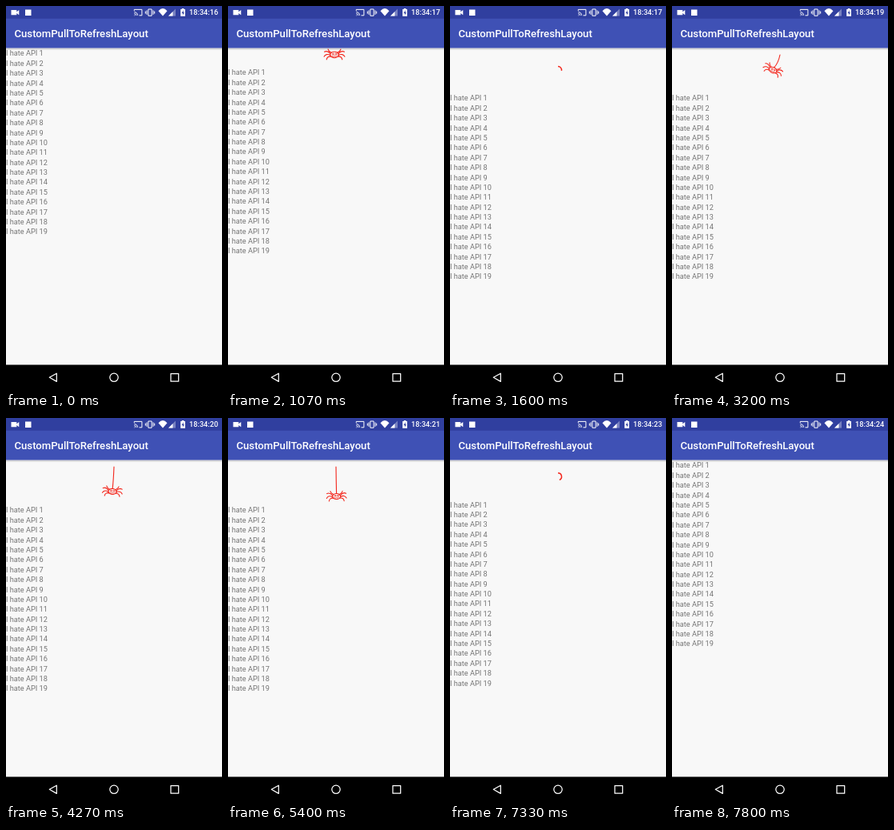
Animation of 270x480 px, one loop 7870 ms. Source, as an HTML page:

```html
<!DOCTYPE html>
<html lang="en">
<head>
<meta charset="utf-8">
<title>CustomPullToRefreshLayout</title>
<style>
  html, body { margin: 0; width: 100%; height: 100%; overflow: hidden; background: #f8f8f8; }
  svg { display: block; width: 270px; height: 480px; font-family: Roboto, sans-serif; }
</style>
</head>
<body>
<svg viewBox="0 0 270 480">
  <defs>
    <linearGradient id="shade" x2="0" y2="1">
      <stop offset="0" stop-color="#000" stop-opacity=".22"/>
      <stop offset="1" stop-color="#000" stop-opacity="0"/>
    </linearGradient>
    <g id="legs">
      <path d="M3.5-2.5C5.5-3.5 7-4 7.6-6.6M4.8-1.2C7-4 10-4.6 12-3.6M5 .6C8-1.2 11-.6 12.4 2.2M4 2.2C7 1.6 9 3 9.4 5.8"/>
    </g>
  </defs>
  <rect width="270" height="480" fill="#f8f8f8"/>

  <g fill="none" stroke="#f3261c" stroke-linecap="round">
    <path id="arc" stroke-width="1.5" stroke-linecap="butt"/>
    <g id="spider">
      <path id="thread" stroke-width="1.1"/>
      <g id="bug" stroke-width="1.1">
        <use href="#legs"/>
        <use href="#legs" transform="scale(-1 1)"/>
        <ellipse rx="5" ry="3.5"/>
        <path d="M-2.8 1.3L-1.4 2.2 0 1.4 1.4 2.2 2.8 1.3" stroke-width=".7"/>
        <g stroke-width=".7"><circle cx="-1.7" cy="-.8" r=".9"/><circle cx="1.7" cy="-.8" r=".9"/></g>
      </g>
    </g>
  </g>

  <g id="list" font-size="9.19" fill="#737373"></g>

  <rect y="52.5" width="270" height="3" fill="url(#shade)"/>
  <rect width="270" height="52.5" fill="#3f51b5"/>
  <rect width="270" height="15.75" fill="#303f9f"/>
  <text x="10.5" y="38.8" font-size="13.13" font-weight="500" fill="#fff">CustomPullToRefreshLayout</text>

  <g fill="#fff">
    <path d="M6.5 5h6.8v2.2l3-2.2v6.2l-3-2.2v2.2H6.5z"/>
    <rect x="24" y="4.5" width="7.5" height="7.5"/>
    <path d="M190.5 6.2Q196-.2 201.5 6.2L196 12.6z"/>
    <path d="M203 12.5L212 3.6V12.5z" opacity=".35"/>
    <path d="M203 12.5L208.5 7V12.5z"/>
    <path d="M219.8 3h2.6v1h1.6v8.8h-5.8V4h1.6z"/>
    <path d="M221.7 5.3l-2.1 3.6h1.3v2.6l2-3.5h-1.2z" fill="#303f9f"/>
    <text id="clock" x="265.2" y="11.3" font-size="9.19" font-weight="500" text-anchor="end"></text>
  </g>
  <g fill="none" stroke="#fff">
    <path d="M160.3 6.2V4.4h9.6v7.4h-3.4M160.3 11.8h.6M160.3 9.6q2.2 0 2.2 2.2M160.3 7.7q4.1 0 4.1 4.1"/>
    <path d="M177.9 4h4.2v8.2h-4.2zM176 5.4v5.4M174.3 6.6v3M184 5.4v5.4M185.7 6.6v3"/>
  </g>

  <rect y="448.5" width="270" height="31.5"/>
  <g fill="none" stroke="#fff" stroke-width="1.25" stroke-linejoin="round">
    <path d="M63.3 459.2V469.4L54.3 464.3z"/>
    <circle cx="135" cy="464.3" r="5.2"/>
    <rect x="206" y="459.5" width="9.7" height="9.7"/>
  </g>
</svg>
<script>
const LOOP = 7870, STEP = 200 / 3, OPEN = 56;
const $ = id => document.getElementById(id);
const clamp = x => Math.max(0, Math.min(1, x));
const show = (el, on) => el.setAttribute('visibility', on ? 'visible' : 'hidden');

for (let i = 1; i <= 19; i++) {
  const row = document.createElementNS('http://www.w3.org/2000/svg', 'text');
  row.setAttribute('y', 62.4 + (i - 1) * 12.39);
  row.textContent = 'I hate API ' + i;
  $('list').append(row);
}

// piecewise linear track of [time, value] points
function track(points, t) {
  const i = points.findIndex(p => p[0] > t);
  if (i === 0) return points[0][1];
  if (i < 0) return points[points.length - 1][1];
  const [a, x] = points[i - 1], [b, y] = points[i];
  return x + (y - x) * (t - a) / (b - a);
}

const THREAD = [[2700, 0], [2950, 13], [3200, 21], [3470, 26], [4270, 31],
  [5070, 35.8], [5400, 37], [5550, 35], [5870, 19], [6270, 0]];
const SPIN_UP = [[1500, 0], [1600, .28], [1730, .36], [1930, .42], [2700, 1]];

// the screen updates 15 times a second and stalls twice after the release
function sample(t) {
  if (t >= 1600 && t < 1730) return 1600;
  if (t >= 1730 && t < 1930) return 1730;
  return Math.floor((t + 5) / STEP) * STEP;
}

function pullOffset(t) {
  if (t < 1600) return OPEN * (1 - (1 - clamp((t - 740) / 820)) ** 1.1);
  return OPEN * (1 + Math.cos(Math.PI * clamp((t - 7220) / 500))) / 2;
}

function drawArc(v, cy) {
  const r = 4.5, end = v, start = v - (.5 - Math.abs(v - .5));
  const at = u => {
    const a = (u - .25) * 2 * Math.PI;
    return (135 + r * Math.cos(a)).toFixed(2) + ' ' + (cy + r * Math.sin(a)).toFixed(2);
  };
  $('arc').setAttribute('d', `M${at(start)}A${r} ${r} 0 0 1 ${at(end)}`);
}

function render(now) {
  const t = sample(now), off = pullOffset(t);
  const pulling = t > 740 && t < 1500;
  const hanging = t >= 2700 && t < 6270;
  const spinning = (t >= 1500 && t < 2700) || (t >= 6270 && t < 7720);

  $('list').setAttribute('transform', `translate(0 ${off.toFixed(2)})`);
  $('clock').textContent = '18:34:' + (16 + Math.floor((t + 201) / 1000));

  show($('arc'), spinning);
  show($('spider'), pulling || hanging);
  show($('thread'), hanging);

  if (spinning) {
    const v = t < 2700 ? track(SPIN_UP, t) : (t - 6300 + 720) / 720 % 1;
    drawArc(v, 80 + off - OPEN);
  }
  if (pulling) {
    $('spider').setAttribute('transform', `translate(133 ${46.6 + .597 * off})`);
    $('bug').setAttribute('transform', 'scale(1.04)');
  }
  if (hanging) {
    const len = track(THREAD, t), dt = t - 3200;
    const swing = 25 * Math.exp(-dt / 1020) * Math.cos(2 * Math.PI * dt / 1300);
    $('spider').setAttribute('transform', `translate(135 61) rotate(${swing})`);
    $('thread').setAttribute('d', `M0 0Q${swing * .1} ${len * .5} 0 ${Math.max(0, len - 3.5)}`);
    $('bug').setAttribute('transform', `translate(0 ${len})`);
  }
}

const begin = performance.now();
function tick() {
  render((performance.now() - begin) % LOOP);
  requestAnimationFrame(tick);
}
tick();
</script>
</body>
</html>
```
